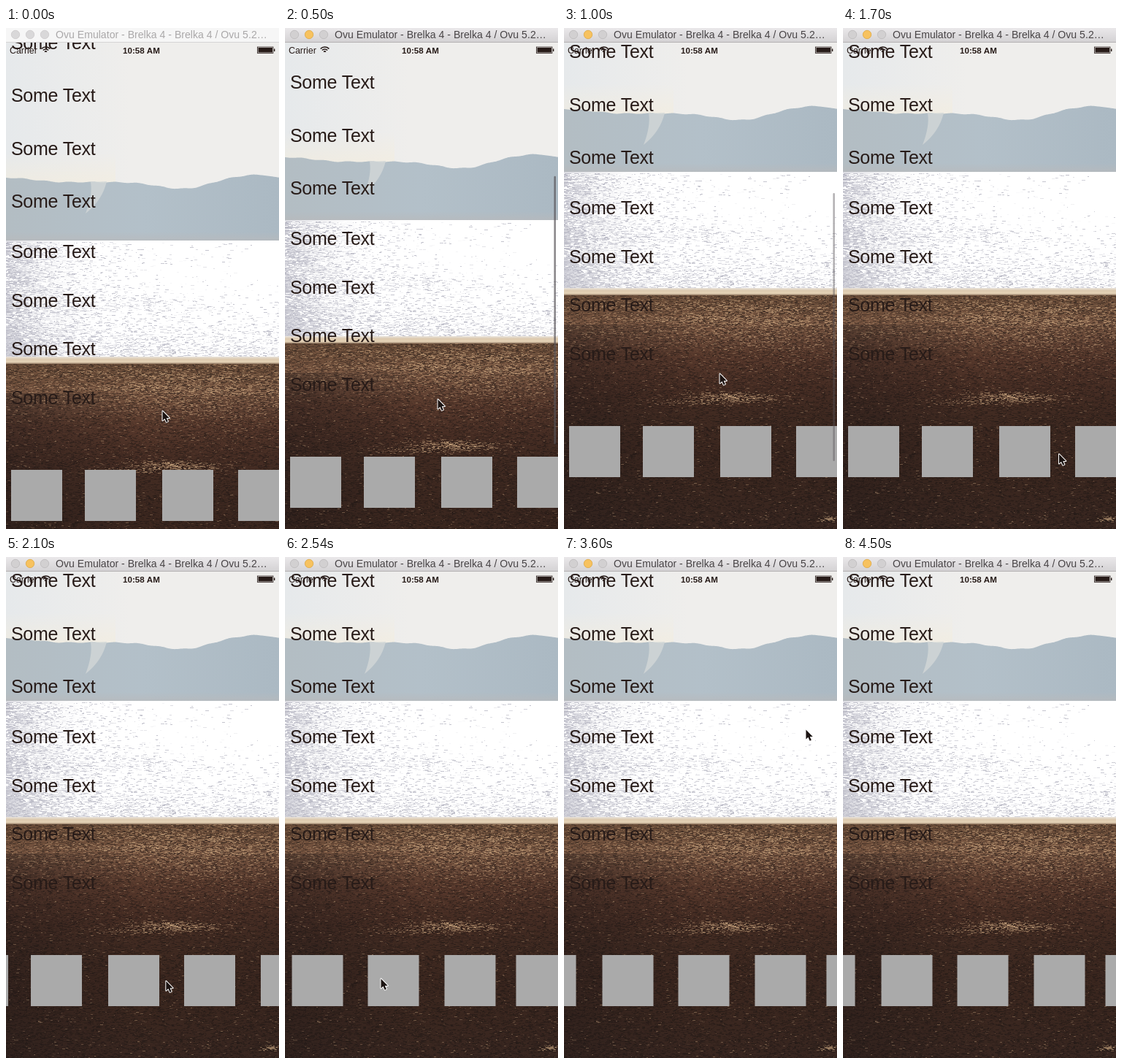
These frames come from a looping animation (374 px wide and 686 px high, 4.52 s). An HTML page with a canvas:

```html
<!DOCTYPE html>
<html>
<head>
<meta charset="utf-8">
<style>
html, body { margin: 0; width: 100%; height: 100%; overflow: hidden; }
canvas { display: block; }
</style>
</head>
<body>
<canvas id="stage" width="374" height="686"></canvas>
<script>
const W = 374, LOOP = 4520, BAR = 20, FOCUS = 200;
const HORIZON = 291, SHORE = 450, SAND = 459, DEPTH = 800;
const SANS = '"Liberation Sans", Arial, sans-serif';
const INK = '#271b18';
const g = document.getElementById('stage').getContext('2d');

let seed = 7;
const rand = () => (seed = seed * 16807 % 2147483647) / 2147483647;
const ramp = (v, from, to) => {
  const p = Math.min(1, Math.max(0, (v - from) / (to - from)));
  return p * p * (3 - 2 * p);
};
const bump = (x, y, cx, cy, rx, ry) => Math.exp(-(((x - cx) / rx) ** 2) - ((y - cy) / ry) ** 2);

// Evenly spaced colour stops, running down or across.
function gradient(c, from, to, colors, across) {
  const fill = across ? c.createLinearGradient(from, 0, to, 0) : c.createLinearGradient(0, from, 0, to);
  colors.forEach((color, i) => fill.addColorStop(i / (colors.length - 1), color));
  return fill;
}

function rect(c, x, y, w, h, fill) {
  c.fillStyle = fill;
  c.fillRect(x, y, w, h);
}

// Fills every row with short strokes coloured by a rule.
function grain(c, top, bottom, length, color) {
  for (let y = top; y < bottom; y++)
    for (let x = 0, w; x < W; x += w) {
      w = 1 + Math.floor(rand() * length);
      const fill = color(x, y, rand());
      if (fill) rect(c, x, y, w, 1, fill);
    }
}

const ridge = x => 205 + 6 * ramp(x, 0, 80) + 9 * bump(x, 0, 240, 0, 45, 1) - 10 * ramp(x, 250, 345)
  + 4 * ramp(x, 350, 374) + Math.sin(x / 5) * 0.6;

function paintPhoto() {
  const photo = document.createElement('canvas');
  photo.width = W;
  photo.height = DEPTH;
  const c = photo.getContext('2d');

  rect(c, 0, 0, W, HORIZON, gradient(c, 0, 170, ['#e6e9eb', '#efeeec'], true));
  rect(c, 0, 170, 150, 50, gradient(c, 170, 212, ['#f4eddd00', '#f4eddd99']));

  c.beginPath();
  c.moveTo(W, HORIZON);
  c.lineTo(0, HORIZON);
  for (let x = 0; x <= W; x++) c.lineTo(x, ridge(x));
  c.fillStyle = gradient(c, 0, W, ['#b3bdc3', '#b3c0c9', '#abb9c3'], true);
  c.fill();
  rect(c, 0, HORIZON - 12, W, 12, gradient(c, HORIZON - 12, HORIZON, ['#b8b9bb00', '#b8b9bbaa']));

  c.beginPath();
  c.moveTo(116, 211);
  c.quadraticCurveTo(119, 228, 109, 254);
  c.quadraticCurveTo(132, 236, 138, 210);
  c.fillStyle = '#d3d7d8cc';
  c.fill();

  rect(c, 0, HORIZON, W, SHORE - HORIZON, '#fff');
  rect(c, 0, HORIZON, 130, SHORE - HORIZON, gradient(c, 0, 130, ['#dcdce2', '#ffffff00'], true));
  grain(c, HORIZON + 2, SHORE, 5, (x, y, n) => {
    const shade = 0.75 * Math.exp(-x / 80) + 0.55 * ((y - HORIZON) / 160) ** 4
      + 0.25 * bump(x, y, 110, 378, 130, 10);
    return n < shade ? `rgba(172, 172, 186, ${rand() * 0.75})` : x < 130 && n > 0.75 && '#fff';
  });

  rect(c, 0, SHORE, W, SAND - SHORE + 2, gradient(c, SHORE, SAND + 2, ['#e8e2da', '#dcc9ae', '#e6d4b8', '#6f5340']));

  rect(c, 0, SAND + 1, W, DEPTH, gradient(c, SAND, DEPTH,
    ['#694c38', '#765440', '#58392c', '#482e24', '#402a21', '#3c271f', '#3b271f', '#3a2720', '#382620']));
  rect(c, 0, 500, W, DEPTH, gradient(c, 0, W, ['#20181855', '#20181800', '#20181811'], true));
  grain(c, SAND + 1, DEPTH, 4, (x, y, n) => {
    const bands = 0.75 + 0.25 * Math.sin(y / 3 + Math.sin(x / 70));
    const light = 0.03 + 0.6 * bands * bump(x, y, 250, 488, 210, 28) + 0.12 * bump(x, y, 280, 530, 100, 28)
      + 0.8 * bump(x, y, 230, 599, 55, 7) + 0.35 * bump(x, y, 165, 606, 50, 4) + 0.9 * bump(x, y, 362, 766, 12, 4);
    if (n < light) return `rgba(218, 182, 140, ${rand() * (0.35 + light * 0.6)})`;
    return n > 0.5 && `rgba(22, 18, 17, ${rand() * 0.5})`;
  });
  return photo;
}

// Keys are [time, value, ...]; eased between neighbours, held outside.
function track(keys, t) {
  const last = Math.max(0, keys.findLastIndex(k => k[0] <= t));
  const a = keys[last], b = keys[last + 1] || a;
  const p = a === b ? 0 : ramp(t, a[0], b[0]);
  return a.slice(1).map((v, i) => v + (b[i + 1] - v) * p);
}

const SCROLL = [[FOCUS, 0], [500, 18], [920, 60]];
const SLIDE = [[1800, 0], [2540, 204.5], [3080, 161.5]];
const POINTER = [[FOCUS, 214.5, 524], [500, 209.5, 508], [1000, 213.5, 473], [1700, 296, 583],
  [2540, 131.5, 577], [3600, 331.5, 236], [4200, 392, 150]];
const TILES = [7, 108, 214, 318, 423, 521];
const rowTop = i => Math.min(20 + 72.4 * i, 39.2 + 66.7 * i);

function text(str, x, y, font, color = INK) {
  g.font = `${font} ${SANS}`;
  g.fillStyle = color;
  g.fillText(str, x, y);
}

function drawStatus() {
  text('Carrier', 5, 35, '12.4px');
  text('10:58 AM', 160, 35, 'bold 11.6px');
  g.strokeStyle = INK;
  g.lineWidth = 1.6;
  for (const r of [2, 5, 8]) {
    g.beginPath();
    g.arc(54.5, 34, r, -Math.PI * 0.76, -Math.PI * 0.24);
    g.stroke();
  }
  g.lineWidth = 0.8;
  g.strokeRect(344.5, 26, 21.5, 8.5);
  rect(g, 345.5, 27, 19.5, 6.5, INK);
  rect(g, 367, 28.5, 1.4, 3.5, INK);
}

function drawTitleBar(active) {
  rect(g, 0, 0, W, BAR, active ? gradient(g, 0, BAR, ['#eae8ea', '#d3d1d3']) : '#f6f6f6');
  rect(g, 0, BAR - 1, W, 1, active ? '#b5b2b3' : '#d5d4d5');
  for (let i = 0; i < 3; i++) {
    const lit = active && i === 1;
    g.beginPath();
    g.arc(13 + 20 * i, 9, 5.7, 0, Math.PI * 2);
    g.fillStyle = lit ? '#f7c25f' : active ? '#d2d0d1' : '#d9d8d9';
    g.fill();
    g.strokeStyle = lit ? '#dea945' : active ? '#bdbabc' : '#cccacb';
    g.stroke();
  }
  text('Ovu Emulator - Brelka 4 - Brelka 4 / Ovu 5.2…', 68, 14, '14.1px', active ? '#484446' : '#aaa8a9');
}

const arrow = new Path2D('M0 .5V13.5L3 10.8 5.2 15.7 7.4 14.7 5.3 10H9.3Z');

function drawPointer(x, y) {
  g.save();
  g.translate(x, y);
  g.lineJoin = 'round';
  g.strokeStyle = '#fff';
  g.lineWidth = 2;
  g.stroke(arrow);
  g.fillStyle = '#1c1412';
  g.fill(arrow);
  g.restore();
}

function drawIndicator(t, scroll) {
  const alpha = 0.7 * ramp(t, FOCUS, 300) * (1 - ramp(t, 900, 1150));
  g.fillStyle = `rgba(88, 83, 88, ${alpha})`;
  g.beginPath();
  g.roundRect(368.5, 193 + scroll * 0.548, 2.5, 367, 1.2);
  g.fill();
}

const photo = paintPhoto();

function draw(t) {
  const [scroll] = track(SCROLL, t), [slide] = track(SLIDE, t);
  g.drawImage(photo, 0, Math.round(-scroll * 94 / 60));

  drawStatus();
  g.letterSpacing = '-0.3px';
  for (let i = 0; i < 8; i++) text('Some Text', 7, Math.round(rowTop(i) + 9 - scroll), '25px');
  g.letterSpacing = '0px';

  TILES.forEach(x => rect(g, x - slide, Math.round(605 - scroll), 70, 70, '#aaa'));
  drawIndicator(t, scroll);
  drawTitleBar(t >= FOCUS);
  drawPointer(...track(POINTER, t));
}

const start = performance.now();
function tick() {
  draw((performance.now() - start) % LOOP);
  requestAnimationFrame(tick);
}
tick();
</script>
</body>
</html>
```
